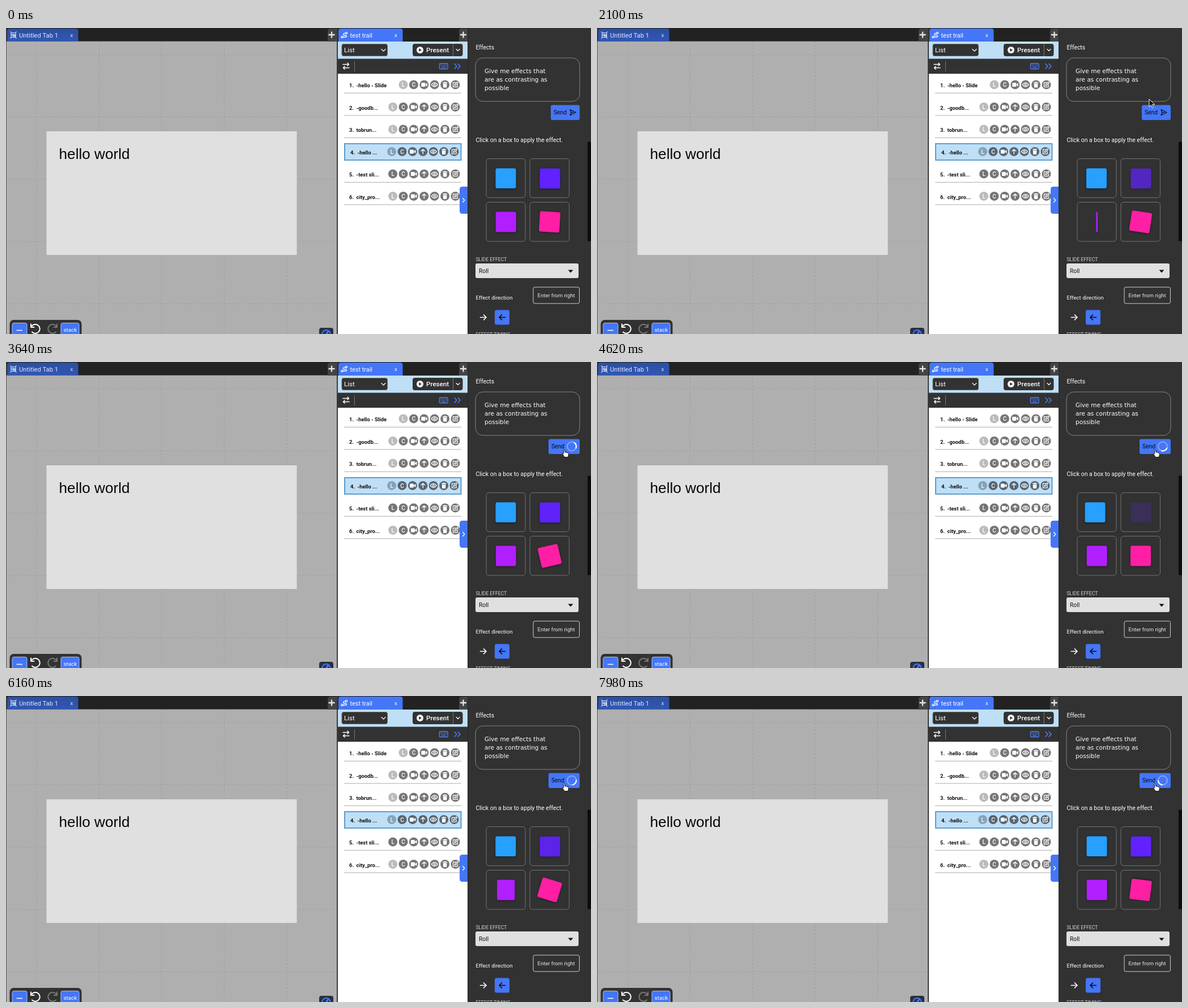
Recreate the animation shown at these times as an HTML page. Size 1033x542 px, loop 8 s.

```html
<!DOCTYPE html>
<html lang="en">
<head>
<meta charset="utf-8">
<title>Slide effects</title>
<style>
  html, body { margin: 0; width: 100%; height: 100%; overflow: hidden; background: #323232; }
  svg { display: block; width: 1033px; height: 542px; }
  text { font-family: Roboto, sans-serif; white-space: pre; }
  .prompt { font-family: "DejaVu Sans", sans-serif; }
  .arial { font-family: "Liberation Sans", Arial, sans-serif; }
  .line { fill: none; stroke-linecap: round; stroke-linejoin: round; }
  .box { filter: drop-shadow(0 1px 2px rgba(0, 0, 0, .45)); }
</style>
</head>
<body>
<svg id="stage" viewBox="0 0 1033 542" xmlns="http://www.w3.org/2000/svg">
  <defs>
    <linearGradient id="tab" x2="0" y2="1">
      <stop stop-color="#2c4f9f"/><stop offset="1" stop-color="#3157b5"/>
    </linearGradient>
    <clipPath id="tile"><rect x="848" y="232" width="69" height="69" rx="5"/></clipPath>
    <g id="cam"><rect x="-5" y="-3.5" width="7" height="7" rx="1"/><path d="M2.5-1 5.5-3.2V3.2L2.5 1Z"/></g>
    <g id="up" class="line" stroke="#fff" stroke-width="1.4"><path d="M0 4V-4M-3.3-.8 0-4 3.3-.8"/></g>
    <g id="eye" class="line" stroke="#fff" stroke-width="1.2"><path d="M-5.5 0Q0-7 5.5 0Q0 7-5.5 0Z"/><circle r="1.6"/></g>
    <g id="bin"><path d="M-4-4.3H-1.6L-1-5.2H1L1.6-4.3H4V-3H-4ZM-3.4-2.2H3.4L3 5H-3Z"/></g>
    <g id="edit" class="line" stroke="#fff" stroke-width="1.2"><path d="M.5-3.7H-4V4H3.7V0M-1.5 1.5-1-.8 3.7-5 5-3.6.6.9Z"/></g>
  </defs>

  <!-- canvas pane -->
  <rect width="585" height="542" fill="#afafaf"/>
  <g id="grid" stroke="#979797" stroke-width="1" stroke-dasharray="2 4"/>
  <rect x="71.5" y="183" width="442" height="219" fill="#e0e0e0"/>
  <text class="arial" x="93.5" y="232" font-size="26.2" fill="#060606">hello world</text>
  <rect width="815" height="24" fill="#222"/>
  <path d="M2 24V5Q2 1 6 1H123Q127.500 1 127.500 5V24Z" fill="url(#tab)"/>
  <path d="M0 23.500H585" stroke="#41619f" stroke-width="1"/>
  <path d="M0 0V542" stroke="#555" stroke-width="2"/>
  <g class="line" stroke="#dfe8ff" stroke-width="1.200">
    <path d="M9 8.500H17V16.500H9ZM11 11H14V13.500H11ZM13 13V15H16V12H14"/>
    <path d="M7.500 7H9M17 7H18.500M7.500 18H9M17 18H18.500"/>
  </g>
  <text x="23" y="16.500" font-size="11.3" fill="#dfe8ff">Untitled Tab 1</text>
  <text x="113.500" y="16" font-size="9.5" fill="#dfe8ff">x</text>
  <path d="M568 24V6Q568 1 573 1H584V24Z" fill="#444"/>
  <path d="M569.500 12H580.500M575 6.500V17.500" stroke="#e6e6e6" stroke-width="2.300"/>

  <rect x="6.500" y="517" width="127" height="32" rx="7" fill="#323232"/>
  <g fill="#4476f7" stroke="#a9c0fa" stroke-width="1">
    <rect x="11" y="522.500" width="26" height="28" rx="3"/>
    <rect x="97" y="522.500" width="32" height="28" rx="3"/>
  </g>
  <path d="M18.500 535.500H29" stroke="#fff" stroke-width="1.500"/>
  <text x="101.500" y="538" font-size="9.8" fill="#fff">stack</text>
  <g class="line" stroke-width="2">
    <path d="M44 524.500V530H49.500M44.500 529.500A8 8 0 1 1 46 538.500" stroke="#fff"/>
    <path d="M90 524.500V530H84.500M89.500 529.500A8 8 0 1 0 88 538.500" stroke="#777"/>
  </g>
  <rect x="553" y="531" width="25" height="18" rx="4" fill="#29303f"/>
  <circle cx="565.500" cy="542" r="7" fill="none" stroke="#4476f7" stroke-width="2"/>
  <path d="M565.500 542 570 536" stroke="#4476f7" stroke-width="3"/>

  <!-- trail pane -->
  <rect x="586" y="24" width="229" height="518" fill="#fff"/>
  <path d="M585 0V542" stroke="#3a3a3a" stroke-width="2"/>
  <path d="M587 24V5Q587 1 591 1H696Q700.500 1 700.500 5V24Z" fill="#4476f7"/>
  <g class="line" stroke="#fff" stroke-width="1.300">
    <circle cx="593.500" cy="16" r="1.600"/><circle cx="601" cy="9" r="1.600"/>
    <path d="M595 16H600.500Q603 14.500 600 13H597Q594 11.500 597 9.500H599"/>
  </g>
  <text x="607.500" y="16.500" font-size="10.9" fill="#fff">test trail</text>
  <text x="686" y="16" font-size="9.500" fill="#fff">x</text>
  <path d="M800 24V6Q800 1 805 1H815V24Z" fill="#444"/>
  <path d="M802 12H813M807.500 6.500V17.500" stroke="#e6e6e6" stroke-width="2.300"/>
  <rect x="586" y="24" width="229" height="31" fill="#bfdff7"/>
  <rect x="593" y="28.500" width="80.500" height="21" rx="3" fill="#323232" stroke="#666"/>
  <text x="597" y="43" font-size="11.600" fill="#fff">List</text>
  <path class="line" d="M663 37.500 666.500 41 670 37.500" stroke="#fff" stroke-width="1.200"/>
  <rect x="718" y="28" width="88.500" height="22" rx="4" fill="#323232"/>
  <path d="M789.500 28V50" stroke="#777"/>
  <circle cx="731" cy="39" r="6" fill="#fff"/><path d="M729.300 36 734 39 729.300 42Z" fill="#323232"/>
  <text x="742" y="43" font-size="11.600" font-weight="500" fill="#fff">Present</text>
  <path class="line" d="M795 37.500 798 40.500 801 37.500" stroke="#fff" stroke-width="1.200"/>
  <rect x="586" y="54.500" width="229" height="26.500" fill="#323232"/>
  <path class="line" d="M595 64.500H605M603 62 605.500 64.500 603 67M606 70.500H596M598 68 595.500 70.500 598 73" stroke="#fff" stroke-width="1.500"/>
  <path d="M615.500 59V77" stroke="#777"/>
  <rect x="765.500" y="63" width="14.500" height="9.500" rx="1" fill="none" stroke="#4f82ff" stroke-width="1.300"/>
  <path d="M767.500 65.700H778.500M767.500 67.900H778.500" stroke="#4f82ff" stroke-width="1.200" stroke-dasharray="1.300 1"/>
  <path d="M769.500 70.200H776" stroke="#4f82ff" stroke-width="1.200"/>
  <path class="line" d="M792 63.500 796 67.700 792 72M798 63.500 802 67.700 798 72" stroke="#4f82ff" stroke-width="1.500"/>
  <g id="rows"/>
  <path d="M815 281H806Q801 281 801 286V324Q801 329 806 329H815Z" fill="#4476f7"/>
  <path class="line" d="M806.500 301.500 809.800 305 806.500 308.500" stroke="#fff" stroke-width="1.300"/>

  <!-- effects pane -->
  <rect x="815" width="218" height="542" fill="#323232"/>
  <path d="M815.500 0V542" stroke="#252525"/>
  <rect x="1027" y="201.500" width="6" height="176" fill="#0c0c0c"/>
  <g fill="#fff">
    <text x="829.500" y="38" font-size="10.400">Effects</text>
    <text x="829.500" y="202" font-size="10.450">Click on a box to apply the effect.</text>
    <text x="829.500" y="413" font-size="8.650" fill="#d4d4d4">SLIDE EFFECT</text>
    <text x="829.500" y="481" font-size="9.650">Effect direction</text>
    <text x="829.500" y="546" font-size="8.650" fill="#d4d4d4">EFFECT TIMING</text>
  </g>
  <rect x="829" y="53" width="184" height="77" rx="13" fill="#323232" stroke="#858585"/>
  <g class="prompt" fill="#fff" font-size="10.550">
    <text class="prompt" x="845" y="80">Give me effects that</text>
    <text class="prompt" x="845" y="95">are as contrasting as</text>
    <text class="prompt" x="845" y="110">possible</text>
  </g>
  <path id="caret" d="M928 69.500V83.500" stroke="#fff"/>

  <rect id="button" x="962" y="136.500" width="51" height="26.500" rx="3" fill="#4476f7"/>
  <text id="send" x="967" y="153" font-size="10.300" fill="#0a0a0a">Send</text>
  <path id="plane" class="line" d="M996 144.500 1006 149.500 996 154.500 998 149.500ZM998 149.500H1002" stroke="#0a0a0a" stroke-width="1.200"/>
  <g id="spinner" fill="none" stroke-width="2">
    <circle cx="999" cy="149.500" r="8" stroke="#86a6fa"/>
    <path id="arc" d="M993.340 143.840A8 8 0 0 1 1004.660 143.840" stroke="#fff"/>
  </g>

  <g fill="none" stroke="#727272">
    <rect x="848" y="231.500" width="69" height="69" rx="5"/><rect x="925" y="231.500" width="69.500" height="69" rx="5"/>
    <rect x="848" y="308.500" width="69" height="69.500" rx="5"/><rect x="925" y="308.500" width="69.500" height="69.500" rx="5"/>
  </g>
  <g clip-path="url(#tile)"><g id="slide"><rect class="box" x="864.500" y="248.500" width="36" height="35.500" rx="3" fill="#27a0ff"/></g></g>
  <g id="fade"><rect class="box" x="942.500" y="248.800" width="36" height="35.500" rx="3" fill="#6122ff"/></g>
  <g id="flip"><rect class="box" x="-18" y="-18" width="36" height="36" rx="3" fill="#b11fff"/></g>
  <g id="roll"><rect class="box" x="-18" y="-18" width="36" height="36" rx="3" fill="#ff1fa5"/></g>

  <rect x="829" y="417" width="182" height="26" rx="3" fill="#e0e0e0"/>
  <text x="835" y="434" font-size="10.300" fill="#111">Roll</text>
  <path d="M992.500 428.500H1001.500L997 433.500Z" fill="#111"/>
  <rect x="931" y="459" width="81.500" height="29" rx="3" fill="none" stroke="#d0d0d0"/>
  <text x="938.500" y="477" font-size="9.500" fill="#e8e8e8">Enter from right</text>
  <rect x="863" y="499.500" width="26" height="26" rx="3" fill="#4476f7"/>
  <path class="line" d="M837.500 512.500H848M843.500 508 848 512.500 843.500 517" stroke="#fff" stroke-width="1.700"/>
  <path class="line" d="M881.500 512.500H871M875.500 508 871 512.500 875.500 517" stroke="#0a0a0a" stroke-width="1.700"/>

  <path id="arrow" d="M0 0V13.500L3.200 10.600 5.300 15.500 7.500 14.500 5.400 9.700H9.800Z" fill="#111" stroke="#fff"/>
  <path id="hand" d="M2.500 7V1.200Q3.700-.2 4.800 1.200V5Q6.500 4.200 7.200 5.300Q9 4.800 9.400 6Q11.200 5.700 11.300 7.500V10Q10.800 12 10 13.500H4.500Q2.500 11 .6 8Q.8 6.200 2.500 7.500Z" fill="#fff" stroke="#111"/>
</svg>

<script>
const $ = id => document.getElementById(id);
const LOOP = 8000, STEP = 70;

function buildGrid() {
  let out = '';
  for (let i = 0; i < 5; i++) {
    const x = 54 + 110.4 * i, y = 47 + 110.4 * i;
    out += `<path d="M${x} 24V542M2 ${y}H583"/>`;
  }
  $('grid').innerHTML = out;
}

function buildRows() {
  const names = ['-hello - Slide', '-goodb...', 'tobrun...', '-hello ...', '-test sli...', 'city_pro...'];
  const icons = ['L', 'C', 'cam', 'up', 'eye', 'bin', 'edit'];
  $('rows').innerHTML = names.map((name, i) => {
    const y = 100.4 + 39.5 * i, active = i === 3, dx = active ? 2 : 0;
    const list = i ? icons : icons.filter(k => k !== 'up');
    let out = active
      ? `<rect x="598" y="${y - 14}" width="205.500" height="29" fill="#bfdff7" stroke="#5b9bcd" stroke-width="2"/>`
      : `<path d="M597 ${y + 15}H804" stroke="#bcbcbc" stroke-width="1.300"/>`;
    out += `<g font-size="9.400" font-weight="700" fill="#111"><text x="${606 + dx}" y="${y + 4.6}">${i + 1}.</text>` +
      `<text x="${618.500 + dx}" y="${y + 4.6}">${name}</text></g>`;
    list.forEach((icon, k) => {
      const x = 793.5 - dx - 18.4 * (list.length - 1 - k);
      const pale = icon === 'L' && i !== 4;
      const fill = pale ? (active ? '#83a3b8' : '#bbb') : active ? '#566570' : '#757575';
      const mark = icon.length > 1 ? `<use href="#${icon}"/>`
        : `<text y="3.600" font-size="10" font-weight="500" text-anchor="middle">${icon}</text>`;
      out += `<g transform="translate(${x} ${y})" fill="#fff"><circle r="8" fill="${fill}"/>${mark}</g>`;
    });
    return out;
  }).join('');
}

// Critically damped spring: 1 at the start, settling to 0.
const spring = (ms, w) => (1 + w * ms / 1000) * Math.exp(-w * ms / 1000);
const since = (t, start, period) => ((t - start) % period + period) % period;
const place = (id, value) => $(id).setAttribute('transform', value);
const show = (id, on) => { $(id).style.display = on ? '' : 'none'; };

const rollStarts = [-607, 540, 1590, 2600, 3613, 4668, 5723, 6778, 7833];
const pointer = [[490, 928, 88], [980, 919, 107], [1610, 919, 107], [2030, 975, 126], [2520, 975, 126], [2870, 982, 155]];

function pointerAt(t) {
  const i = pointer.findIndex(p => p[0] > t);
  if (i < 0) return pointer[pointer.length - 1].slice(1);
  const a = pointer[i - 1], b = pointer[i], k = (t - a[0]) / (b[0] - a[0]);
  const e = k * k * (3 - 2 * k);
  return [a[1] + (b[1] - a[1]) * e, a[2] + (b[2] - a[2]) * e];
}

function draw(t) {
  place('slide', `translate(${-70 * spring(since(t, 300, 1330), 15)} 0)`);
  $('fade').style.opacity = 1 - spring(since(t, 606, 1320), 14);
  const turn = Math.PI * spring(since(t, 663, 1320), 15);
  place('flip', `translate(882.700 343.400) scale(${Math.max(.06, Math.abs(Math.cos(turn)))} 1)`);
  const start = rollStarts.filter(s => s <= t).pop();
  place('roll', `translate(960 343.400) rotate(${360 * spring(t - start, 11)})`);

  show('caret', t >= 910 && t < 1680);
  const busy = t >= 3150;
  $('button').setAttribute('x', busy ? 958 : 962);
  $('button').setAttribute('width', busy ? 55 : 51);
  $('send').setAttribute('x', busy ? 963 : 967);
  show('plane', !busy);
  show('spinner', busy);
  place('arc', `rotate(${t / 800 * 360 + 235} 999 149.500)`);

  const visible = t >= pointer[0][0];
  const [x, y] = visible ? pointerAt(t) : [0, 0];
  const over = y > 137;
  show('arrow', visible && !over);
  show('hand', visible && over);
  place('arrow', `translate(${x} ${y})`);
  place('hand', `translate(${x} ${y})`);
}

buildGrid();
buildRows();
const begin = performance.now();
function tick() {
  const t = (performance.now() - begin) % LOOP;
  draw(t - t % STEP);
  requestAnimationFrame(tick);
}
tick();
</script>
</body>
</html>
```
